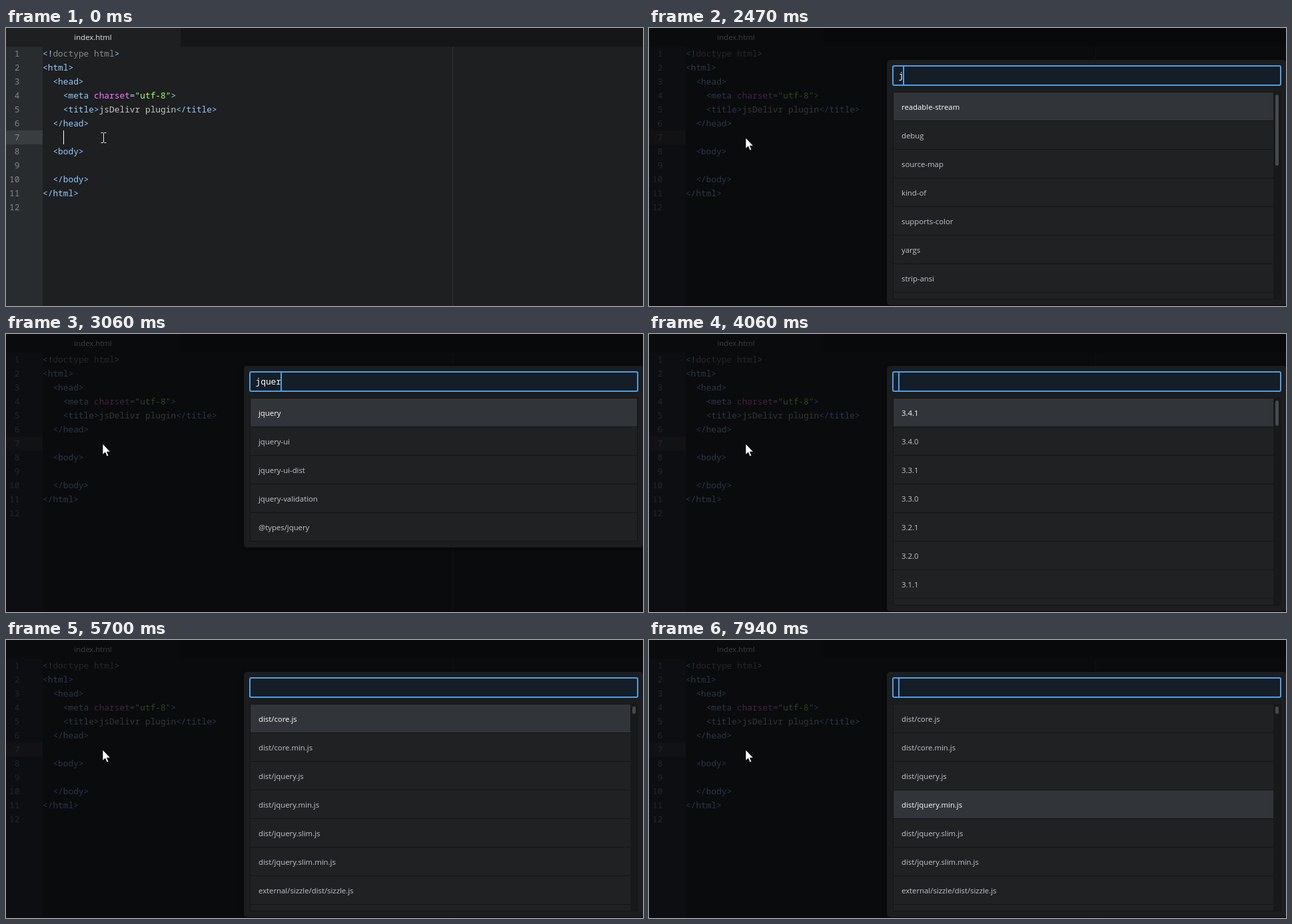
Recreate the animation shown at these times as an HTML page. Size 956 by 418 pixels, loop 8000 ms.

```html
<!DOCTYPE html>
<html lang="en">
<head>
<meta charset="utf-8">
<title>Package picker</title>
<style>
  html, body { margin: 0; width: 100%; height: 100%; overflow: hidden; background: #1d1f21; }
  svg { display: block; width: 956px; height: 418px; }
  text { white-space: pre; }
  .code { font: 500 12.83px "Noto Sans Mono", "DejaVu Sans Mono", monospace; fill: #c5c8c6; }
  .ui { font: 11.35px "Open Sans", "Noto Sans", sans-serif; fill: #c3c7cc; }
  .number { fill: #85888a; text-anchor: end; }
  .tag { fill: #96cbfe; }
  .doctype { fill: #8a8a8a; }
  .attr { fill: #ff73fd; }
  .string { fill: #a8ff60; }
  .ui.selected { fill: #fff; }
</style>
</head>
<body>
<svg id="stage" viewBox="0 0 956 418"></svg>
<script>
const stage = document.getElementById("stage");

function add(parent, name, attrs = {}, text) {
  const node = document.createElementNS("http://www.w3.org/2000/svg", name);
  for (const key in attrs) node.setAttribute(key, attrs[key]);
  if (text !== undefined) node.textContent = text;
  parent.appendChild(node);
  return node;
}
const group = parent => add(parent, "g");
const box = (parent, x, y, width, height, fill, rx = 0) =>
  add(parent, "rect", { x, y, width, height, fill, rx });
const show = (node, visible) => { node.style.display = visible ? "" : "none"; };

const LOOP = 8000;
const CHAR = 7.697;
const LINE = 21;
const ROW = 43;
const BLUE = "#4d9fea";

// Each line: indent in characters, then [class, text] tokens.
const lines = [
  [0, ["tag", "<!"], ["doctype", "doctype html"], ["tag", ">"]],
  [0, ["tag", "<html>"]],
  [2, ["tag", "<head>"]],
  [4, ["tag", "<meta "], ["attr", "charset"], ["tag", "="], ["string", '"utf-8"'], ["tag", ">"]],
  [4, ["tag", "<title>"], ["plain", "jsDelivr plugin"], ["tag", "</title>"]],
  [2, ["tag", "</head>"]],
  [0],
  [2, ["tag", "<body>"]],
  [0],
  [2, ["tag", "</body>"]],
  [0, ["tag", "</html>"]],
  [0]
];

const lists = {
  none: { rows: [] },
  popular: {
    rows: ["readable-stream", "debug", "source-map", "kind-of", "supports-color", "yargs", "strip-ansi", ""],
    thumb: 107
  },
  j: { rows: ["js-yaml", "json5", "jsonfile", "js-tokens", "jsesc"] },
  first: { rows: ["jquery", "jquery-ui", "jquery-ui-dist"] },
  jquery: { rows: ["jquery", "jquery-ui", "jquery-ui-dist", "jquery-validation", "@types/jquery"] },
  more: { rows: ["jquery", "jquery-ui", "jquery-ui-dist", "jquery-validation", "@types/jquery", "jquery-migrate"] },
  versions: { rows: ["3.4.1", "3.4.0", "3.3.1", "3.3.0", "3.2.1", "3.2.0", "3.1.1", ""], thumb: 38 },
  files: {
    rows: ["dist/core.js", "dist/core.min.js", "dist/jquery.js", "dist/jquery.min.js", "dist/jquery.slim.js",
      "dist/jquery.slim.min.js", "external/sizzle/dist/sizzle.js", ""],
    thumb: 11
  }
};

// Time in ms and the properties that change then.
const steps = [
  [0, { dim: 0, arrow: false, open: false, caret: true, query: "", list: "none", selected: 0 }],
  [160, { caret: false }],
  [580, { caret: true }],
  [830, { open: true, dim: 0.35 }],
  [910, { dim: 0.85, arrow: true }],
  [990, { dim: 0.97 }],
  [1150, { dim: 1 }],
  [1320, { list: "popular" }],
  [1730, { caret: false }],
  [2150, { caret: true }],
  [2470, { query: "j" }],
  [2560, { list: "j" }],
  [2640, { query: "jq", list: "none" }],
  [2730, { query: "jqu" }],
  [2810, { query: "jque" }],
  [2890, { query: "jquer" }],
  [2980, { list: "first" }],
  [3060, { list: "jquery" }],
  [3230, { list: "more" }],
  [3300, { caret: false }],
  [3720, { caret: true }],
  [4060, { query: "", list: "versions" }],
  [4380, { caret: false }],
  [4800, { caret: true }],
  [5210, { caret: false }],
  [5380, { caret: true, list: "none" }],
  [5700, { caret: false, list: "files" }],
  [6120, { caret: true }],
  [6530, { caret: false }],
  [6950, { caret: true }],
  [7350, { caret: false }],
  [7530, { selected: 1 }],
  [7690, { selected: 2 }],
  [7850, { selected: 3 }],
  [7940, { caret: true }]
];
const states = [];
for (const [time, change] of steps) states.push({ ...states[states.length - 1], ...change, time });

function buildEditor() {
  box(stage, 0, 0, 956, 418, "#1d1f21");
  box(stage, 262, 0, 694, 28, "#151618");
  add(stage, "text", { class: "ui", x: 130.5, y: 18, "text-anchor": "middle", style: "fill:#e4e6e9" }, "index.html");
  box(stage, 0, 28, 55, 390, "#292c2f");
  box(stage, 0, 154, 55, LINE, "#3a3d3f");
  box(stage, 670, 28, 1, 390, "#303234");
  lines.forEach(([indent, ...tokens], i) => {
    const y = 43 + i * LINE;
    add(stage, "text", { class: "code number", x: 20.5, y }, i + 1);
    const text = add(stage, "text", { class: "code", x: 55 + indent * CHAR, y });
    for (const [kind, part] of tokens) add(text, "tspan", { class: kind }, part);
  });
}

function buildPanel() {
  const root = group(stage);
  const frame = box(root, 357, 48, 600, 57, "#1b1d1f", 5);
  frame.style.filter = "drop-shadow(0 2px 3px rgba(0,0,0,.4))";
  add(root, "rect", {
    x: 366, y: 57, width: 582, height: 29, rx: 2, fill: "#151d26", stroke: BLUE, "stroke-width": 2
  });
  const query = add(root, "text", { class: "code", x: 374.5, y: 76, style: "fill:#fff" });
  const caret = box(root, 374, 58, 2, 27, BLUE);
  const list = group(root);
  return { root, frame, query, caret, list };
}

function drawList({ rows, thumb }, selected) {
  panel.list.replaceChildren();
  const height = Math.min(rows.length * ROW, 311);
  panel.frame.setAttribute("height", height ? height + 58 : 57);
  if (!height) return;
  const bottom = 97 + height;
  box(panel.list, 366, 96, 582, height + 1, "#131517");
  const width = thumb ? 570 : 580;
  rows.forEach((label, i) => {
    const y = 97 + i * ROW;
    const current = i === selected;
    box(panel.list, 367, y, width, Math.min(42, bottom - 1 - y), current ? "#313438" : "#1f2123");
    add(panel.list, "text", { class: current ? "ui selected" : "ui", x: 379, y: y + 26 }, label);
  });
  if (thumb) {
    box(panel.list, 937, 97, 10, height - 1, "#17191b");
    box(panel.list, 940, 100, 5, thumb, "#45494d", 2.5);
  }
}

buildEditor();
const editorCaret = box(stage, 86, 154, 1, LINE, "#fff");
const shade = box(stage, 0, 0, 956, 418, "rgb(4,5,7)");
const panel = buildPanel();
const beam = add(stage, "path", {
  d: "M142.5 157.5h3l1 1 1-1h3M146.5 158v14M142.5 172.5h3l1-1 1 1h3",
  fill: "none", stroke: "#e6e6e6"
});
const arrow = add(stage, "path", {
  d: "M145 165v16.6l3.8-3.6 2.6 6 2.6-1.1-2.5-5.7h5.2z",
  fill: "#fff", stroke: "#000", "stroke-width": 0.8
});

function render(state) {
  const { dim, open, caret, query, list, selected } = state;
  shade.setAttribute("opacity", dim * 0.75);
  show(editorCaret, caret && !open);
  show(beam, !state.arrow);
  show(arrow, state.arrow);
  show(panel.root, open);
  show(panel.caret, caret);
  panel.query.textContent = query;
  panel.caret.setAttribute("x", Math.floor(374.3 + query.length * CHAR));
  drawList(lists[list], selected);
}

const start = performance.now();
let shown;
function tick() {
  const time = (performance.now() - start) % LOOP;
  const state = states.filter(s => s.time <= time).pop();
  if (state !== shown) render(shown = state);
  requestAnimationFrame(tick);
}
tick();
</script>
</body>
</html>
```
